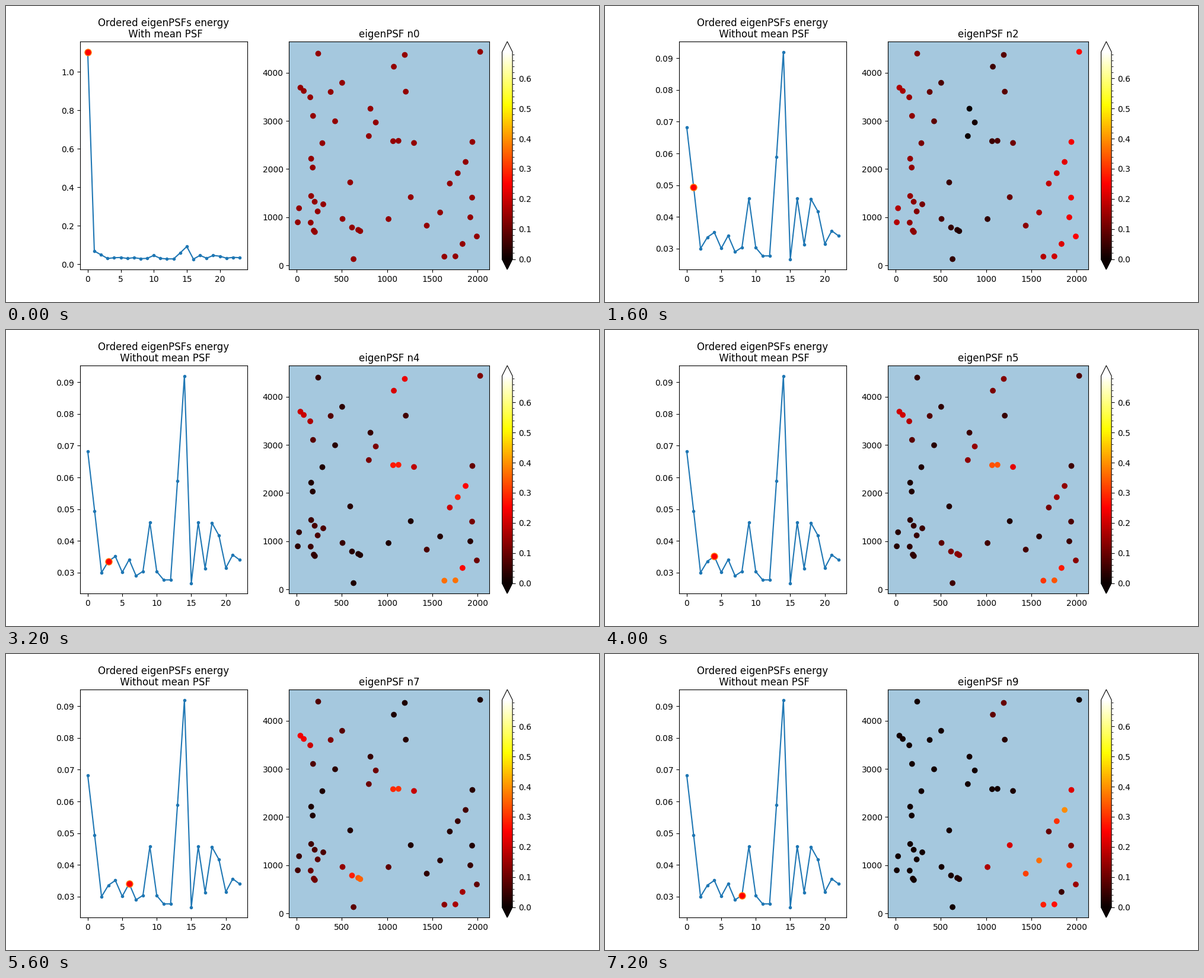
A matplotlib script that plays this animation: 1000 px wide and 500 px high, repeating every 8000 ms.

```python
import matplotlib.pyplot as plt
import numpy as np
from matplotlib.animation import FuncAnimation

# Detector positions of the stars.
STARS = np.array([
    (238, 4400), (2030, 4437), (1196, 4373), (1075, 4128), (41, 3692),
    (78, 3624), (150, 3492), (376, 3603), (503, 3793), (181, 3105),
    (425, 2994), (816, 3255), (875, 2969), (1207, 3609), (798, 2686),
    (284, 2539), (1067, 2580), (1126, 2587), (1298, 2543), (1944, 2564),
    (1869, 2148), (1782, 1915), (1694, 1700), (1941, 1407), (160, 2216),
    (177, 2032), (592, 1723), (1262, 1416), (1587, 1098), (1921, 998),
    (1439, 825), (1993, 600), (1835, 444), (1756, 186), (1634, 180),
    (1016, 961), (160, 1440), (199, 1321), (294, 1268), (26, 1186),
    (232, 1120), (12, 894), (155, 887), (189, 721), (201, 692),
    (507, 964), (612, 786), (681, 736), (703, 711), (629, 129),
])
X, Y = STARS.T / 1000
ASPECT = 1.87

MEAN_ENERGY = 1.104
ENERGY = [.0683, .0494, .0300, .0336, .0351, .0301, .0341, .0290, .0304, .0458,
          .0303, .0277, .0277, .0589, .0920, .0267, .0458, .0313, .0456, .0417,
          .0315, .0356, .0340]


def waves(*peaks, spread=.4, floor=.02):
    """Absolute value of a sum of signed Gaussian bumps (x, y, height)."""
    total = 0
    for x, y, height in peaks:
        dist2 = (ASPECT * (X - x)) ** 2 + (Y - y) ** 2
        total = total + height * np.exp(-dist2 / (2 * spread ** 2))
    return np.abs(total) + floor


flat = np.full(len(STARS), len(STARS) ** -.5)
vertical = .22 * np.tanh(np.abs(Y - 2.2 + .1 * X) / 1.2) ** 1.5
horizontal = .214 * np.abs(X - .82)
upper_left = waves((.3, 3.05, .32), (.85, 3.1, .3), (.17, 2.1, -.32),
                   (1.15, 4.3, -.27), (2, 4.4, -.15), (.1, 1, .08))
lower_right = waves((1.7, .18, .36), (1.83, 1.95, -.27), (1.1, 2.6, .26),
                    (1.14, 4.3, -.22), (.05, 3.65, .18), (2.03, 4.43, .1),
                    (.3, 1.2, .05))
centre = waves((1.1, 2.6, .38), (1.78, .3, .3), (.73, .7, .22),
               (.05, 3.65, .19))
lower_left = waves((.73, .7, .45), (.05, 3.65, .24), (.42, 3.65, .12),
                   (1.12, 2.58, .18), (1.85, 2.1, .08), (.19, .7, .14),
                   (.2, 1.25, .08), (.24, 4.4, .08), spread=.3)
right_side = waves((1.85, 2.15, -.39), (1.5, 1, .34), (1.95, .95, .27),
                   (1.68, .12, -.33), (1.1, 1.15, .16), (1.14, 4.3, .09),
                   floor=.01)

WEIGHTS = [flat, vertical, horizontal, upper_left, lower_right,
           (lower_right + centre) / 2, centre, (centre + lower_left) / 2,
           lower_left, right_side]

fig, (energy_ax, star_ax) = plt.subplots(
    1, 2, figsize=(10, 5), dpi=100, gridspec_kw={"width_ratios": [1, 1.5]})

star_ax.set_facecolor("#a5c8de")
dots = star_ax.scatter(*STARS.T, c=flat, cmap="hot", vmin=0, vmax=.688)
star_ax.set_xlim(-85, 2134)
star_ax.set_ylim(-86, 4651)
bar = fig.colorbar(dots, ax=star_ax, extend="both", aspect=22)
bar.minorticks_on()


def set_title(ax, text):
    ax.set_title(text, pad=5.3, linespacing=1.08)


def draw(n):
    with_mean = n == 0
    energy = [MEAN_ENERGY] + ENERGY if with_mean else ENERGY
    current = 0 if with_mean else n - 1

    energy_ax.clear()
    energy_ax.plot(energy, ".-")
    energy_ax.plot(current, energy[current], "o", color="C1",
                   markerfacecolor="red", markersize=8)
    label = "With" if with_mean else "Without"
    set_title(energy_ax, f"Ordered eigenPSFs energy\n {label} mean PSF")

    dots.set_array(WEIGHTS[n])
    set_title(star_ax, f"eigenPSF n{n}")


anim = FuncAnimation(fig, draw, frames=len(WEIGHTS), interval=800,
                     init_func=lambda: draw(0), repeat=True, repeat_delay=0)
plt.show()
```
